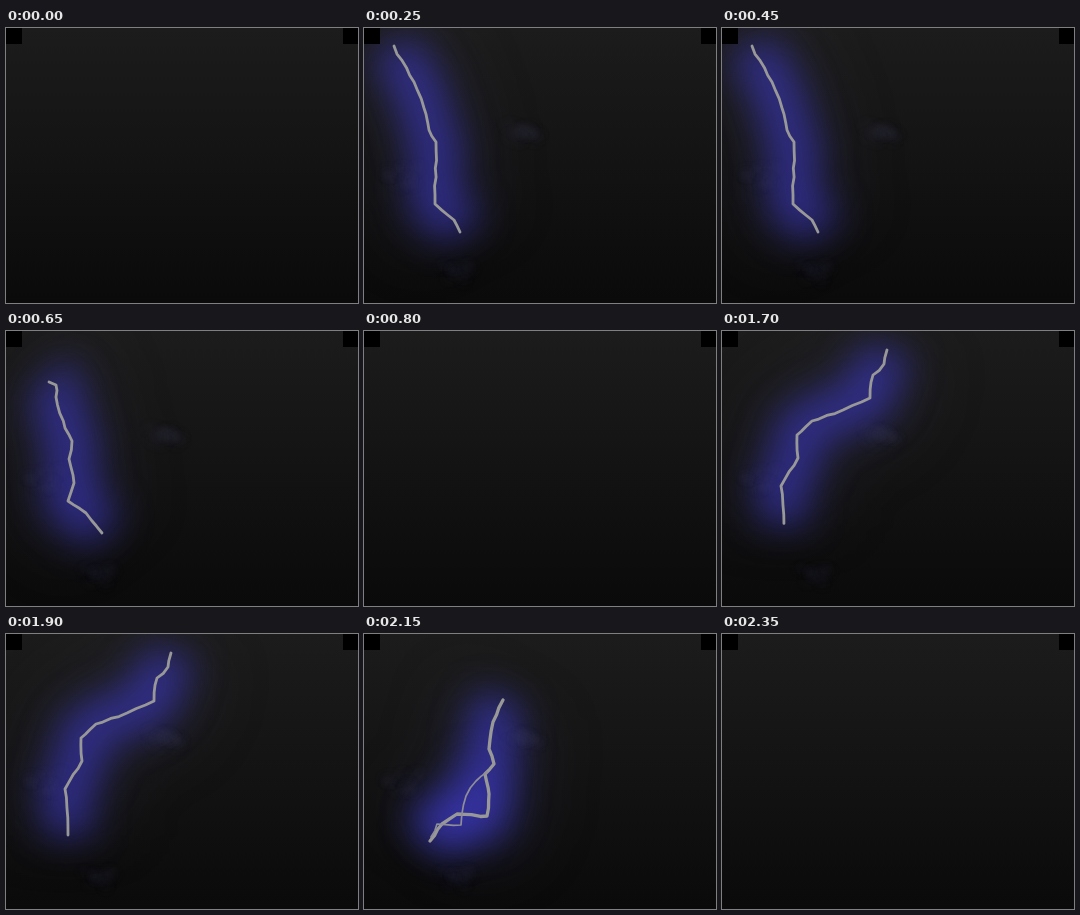
Animation of 352 by 275 pixels, one loop 3.05 s. Source, as an HTML page with a canvas:

```html
<!DOCTYPE html>
<html lang="en">
<head>
<meta charset="utf-8">
<title>Lightning</title>
<style>
  html, body { margin: 0; width: 100%; height: 100%; overflow: hidden; background: #000; }
  canvas { display: block; width: 100%; height: 100%; }
</style>
</head>
<body>
<canvas width="352" height="275"></canvas>
<script>
const LOOP = 3050, STEP = 50, W = 352, H = 275;
const ctx = document.querySelector('canvas').getContext('2d');

let seed = 7;
const random = () => (seed = seed * 16807 % 2147483647) / 2147483647;
const spread = size => (random() * 2 - 1) * size;

// Joins a few corners with a slightly ragged line.
function bolt(...corners) {
  const path = new Path2D();
  let [x, y] = corners[0], total = 0;
  path.moveTo(x, y);
  corners.slice(1).forEach(([endX, endY], i) => {
    const [startX, startY] = corners[i];
    const pieces = Math.ceil(Math.hypot(endX - startX, endY - startY) / 10);
    for (let k = 1; k <= pieces; k++) {
      const inner = k < pieces ? 1 : 0;
      const nextX = startX + (endX - startX) * k / pieces + spread(inner);
      const nextY = startY + (endY - startY) * k / pieces + spread(inner);
      path.lineTo(nextX, nextY);
      total += Math.hypot(nextX - x, nextY - y);
      [x, y] = [nextX, nextY];
    }
  });
  return { path, total };
}

// Leaders run down from the cloud, return strokes run up from the ground.
const strikes = [
  { from: 50, to: 600, first: 30, rate: 50, glow: .8, width: 2.8,
    main: bolt([30, 18], [50, 54], [60, 80], [65, 102], [72, 114], [71, 176], [90, 192], [96, 204]) },
  { from: 600, to: 800, first: 90, rate: 90, glow: .8, width: 2.8,
    main: bolt([96, 202], [80, 182], [62, 170], [68, 152], [63, 128], [66, 110], [59, 97], [50, 66], [50, 54], [43, 51]) },
  { from: 1500, to: 2050, first: 30, rate: 50, glow: .8, width: 2.8,
    main: bolt([165, 19], [162, 33], [151, 44], [148, 67], [121, 79], [90, 90], [75, 104], [76, 127], [59, 155], [62, 201]) },
  { from: 2050, to: 2350, first: 80, rate: 75, glow: .85, width: 3.3,
    main: bolt([66, 207], [78, 190], [93, 180], [123, 182], [125, 160], [121, 140], [130, 130], [125, 115], [129, 88], [139, 66]),
    branch: bolt([67, 203], [73, 190], [97, 191], [102, 162], [112, 147], [123, 138]) }
];

// Small puffs of cloud that show only in the light of a strike
const puffs = [[38, 149], [162, 103], [94, 246]].flatMap(([x, y]) =>
  Array.from({ length: 7 }, () =>
    ({ x: x + spread(14), y: y + spread(9), rx: 5 + random() * 9, ry: 3 + random() * 4, turn: spread(.7) })));

const sky = ctx.createLinearGradient(0, 0, 0, H);
sky.addColorStop(0, '#1c1c1c');
sky.addColorStop(.1, '#1a1a1a');
sky.addColorStop(.5, '#131313');
sky.addColorStop(1, '#0a0a0a');

function line(path, color, width, blur = 0) {
  ctx.filter = blur ? `blur(${blur}px)` : 'none';
  ctx.lineCap = blur ? 'butt' : 'round';
  ctx.strokeStyle = color;
  ctx.lineWidth = width;
  ctx.stroke(path);
  ctx.filter = 'none';
}

function drawPuffs(light) {
  ctx.filter = 'blur(4px)';
  ctx.fillStyle = `rgba(100,98,165,${.05 * light})`;
  for (const { x, y, rx, ry, turn } of puffs) {
    ctx.beginPath();
    ctx.ellipse(x, y, rx, ry, turn, 0, 7);
    ctx.fill();
  }
  ctx.filter = 'none';
}

function drawStrike({ main, branch, from, first, rate, glow, width }, t) {
  const length = Math.min(main.total, first + rate * Math.floor((t - from) / STEP));

  ctx.setLineDash([length, 1000]);
  line(main.path, `rgba(62,62,105,${.22 * glow})`, 105, 28);
  line(main.path, `rgba(60,56,190,${.82 * glow})`, 46, 18);
  if (branch) line(branch.path, `rgba(66,62,215,${.4 * glow})`, 46, 18);

  drawPuffs(length / main.total);

  line(main.path, '#989898', width);
  if (branch) line(branch.path, '#8e8d98', 1.7);
  ctx.setLineDash([]);
}

function draw(t) {
  ctx.fillStyle = sky;
  ctx.fillRect(0, 0, W, H);
  const strike = strikes.find(s => t >= s.from && t < s.to);
  if (strike) drawStrike(strike, t);
  ctx.fillStyle = '#000';
  ctx.fillRect(0, 0, 16, 16);
  ctx.fillRect(337, 0, 15, 16);
}

ctx.lineJoin = 'round';
const start = performance.now();
function frame(now) {
  draw(Math.max(0, now - start) % LOOP);
  requestAnimationFrame(frame);
}
draw(0);
requestAnimationFrame(frame);
</script>
</body>
</html>
```
